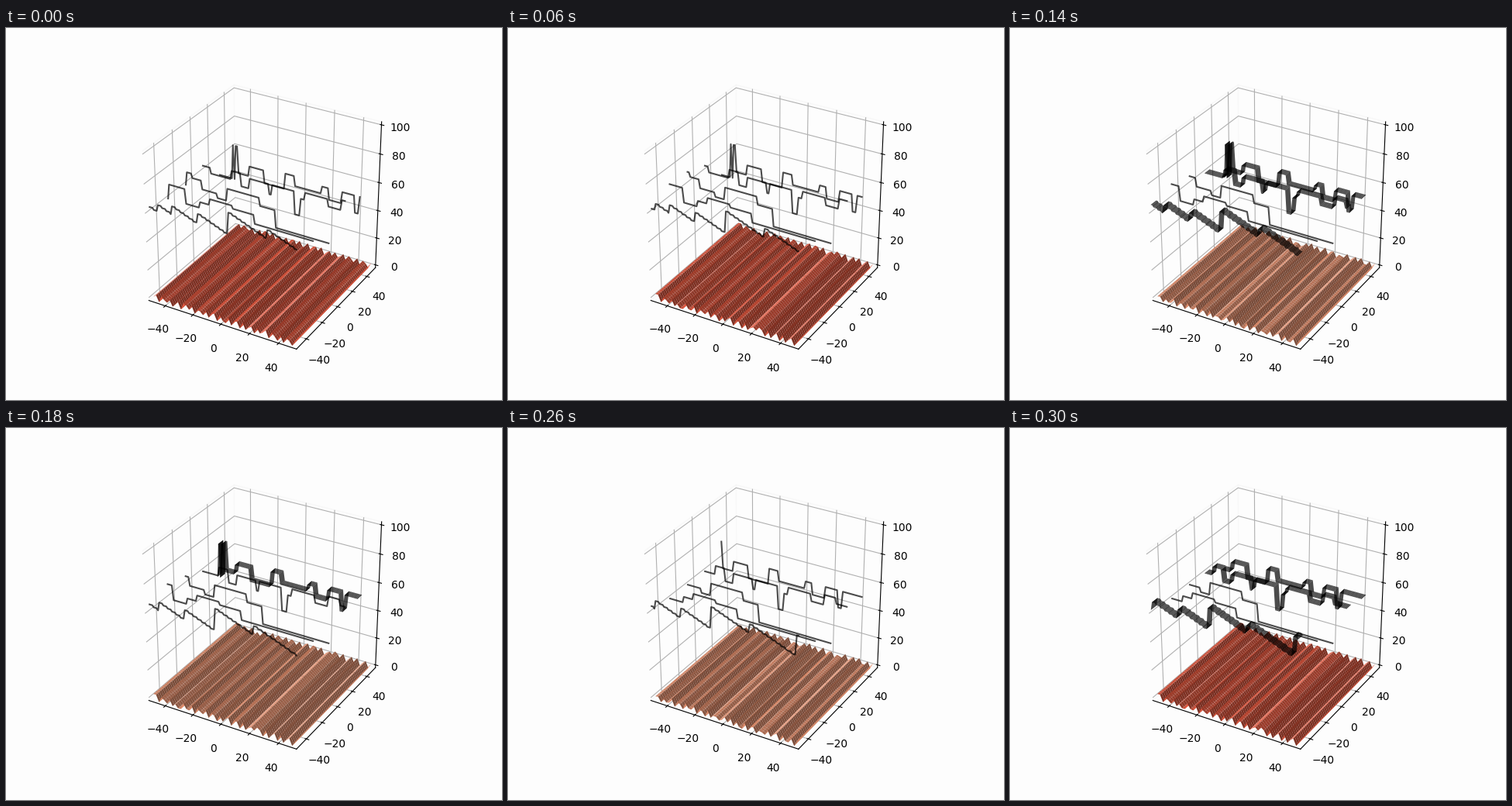
These frames come from a looping animation (640x480 px, 320 ms). A matplotlib script:

```python
import numpy as np
import matplotlib.pyplot as plt
from matplotlib.animation import FuncAnimation
from mpl_toolkits.mplot3d.art3d import Poly3DCollection

STEPS, SPAN, HALF = 16, 101, 3
INK = (0, 0, 0, 0.7)
PAPER = "#fdfdfd"
X = np.linspace(-50, 50, SPAN)


def track(*keys, sag=0.0):
    """Plateaus from (start, level) keys, sagging in steps of three samples."""
    starts, levels = np.array(keys).T
    i = np.arange(SPAN + STEPS)
    k = np.searchsorted(starts, i, side="right") - 1
    return levels[k] - sag * 3 * ((i - starts[k]) // 3)


# Front to back
TRACKS = [
    track((0, 64), (6, 67), (16, 69), (34, 69), (55, 76), (81, 72),
          (106, 62), (112, 74), sag=0.4),
    track((0, 60), (1, 70), (13, 60), (23, 64), (30, 68), (46, 66), (61, 60)),
    track((0, 60), (1, 69), (5, 66), (12, 60), (23, 57), (30, 65.5),
          (53, 60), (64, 48)),
    track((0, 64), (6, 60), (21, 66), (28, 57), (34, 64), (48, 57), (50, 64),
          (66, 48), (70, 60), (73, 65), (89, 60), (98, 67), (106, 63)),
    track((0, 48), (10, 72), (11, 48), (12, 72), (14, 53), (22, 60), (33, 51),
          (48, 62), (55, 55), (74, 60), (79, 52), (88, 60), (97, 48),
          (100, 60)),
]


def is_wide(n, step):
    """Tracks 1 and 2 pulse every third step, the others on an eight-beat."""
    if n in (1, 2):
        return step % 3 == 2
    low, high = {0: (5, 6), 3: (5, 5), 4: (3, 6)}[n]
    return low <= 3 * step % 8 <= high


fig = plt.figure(figsize=(6.4, 4.8), dpi=100, facecolor=PAPER)
ax = fig.add_subplot(projection="3d", computed_zorder=False)
ax.set_facecolor(PAPER)
ax.set_box_aspect((1, 1, 1))
pad = 100 / 48
ax.set_xlim(-50 - pad, 50 + pad)
ax.set_ylim(-50 - pad, 50 + pad)
ax.set_zlim(-pad, 100 + pad)
for axis in (ax.xaxis, ax.yaxis, ax.zaxis):
    axis.pane.set_facecolor(PAPER)
    axis.pane.set_edgecolor("#f3f3f3")

shown = []


def floor(step):
    """Steep ridges running straight from front to back."""
    rng = np.random.default_rng(step % 6)
    line = np.linspace(-50, 50, 51)
    phase = 2.4 * np.arange(51) + rng.normal(0, 0.5, 51)
    gx, gy = np.meshgrid(line, line)
    gz = np.tile(2.6 * np.sin(phase), (51, 1))
    color = "lightsalmon" if 4 <= step <= 13 else "tomato"
    return ax.plot_surface(gx, gy, gz, color=color, rcount=51, ccount=51,
                           zorder=2)


def ribbon(y, z, order):
    near = np.column_stack([X, np.full(SPAN, y - HALF), z])
    far = near + [0, 2 * HALF, 0]
    quads = np.stack([near[:-1], near[1:], far[1:], far[:-1]], axis=1)
    band = Poly3DCollection(quads, facecolors=[INK], edgecolors="none",
                            linewidths=0, zorder=order)
    return ax.add_collection3d(band)


def draw(step):
    while shown:
        shown.pop().remove()
    shown.append(floor(step))
    for n, signal in enumerate(TRACKS):
        y, z, order = -50 + 20 * n, signal[step:step + SPAN], 10 - n
        if is_wide(n, step):
            shown.append(ribbon(y, z, order))
        else:
            shown.extend(ax.plot(X, np.full(SPAN, y), z, color=INK,
                                 lw=1.5, zorder=order))
    return shown


anim = FuncAnimation(fig, draw, frames=STEPS, init_func=lambda: shown,
                     interval=20, repeat=True, repeat_delay=0, blit=False)
plt.show()
```
